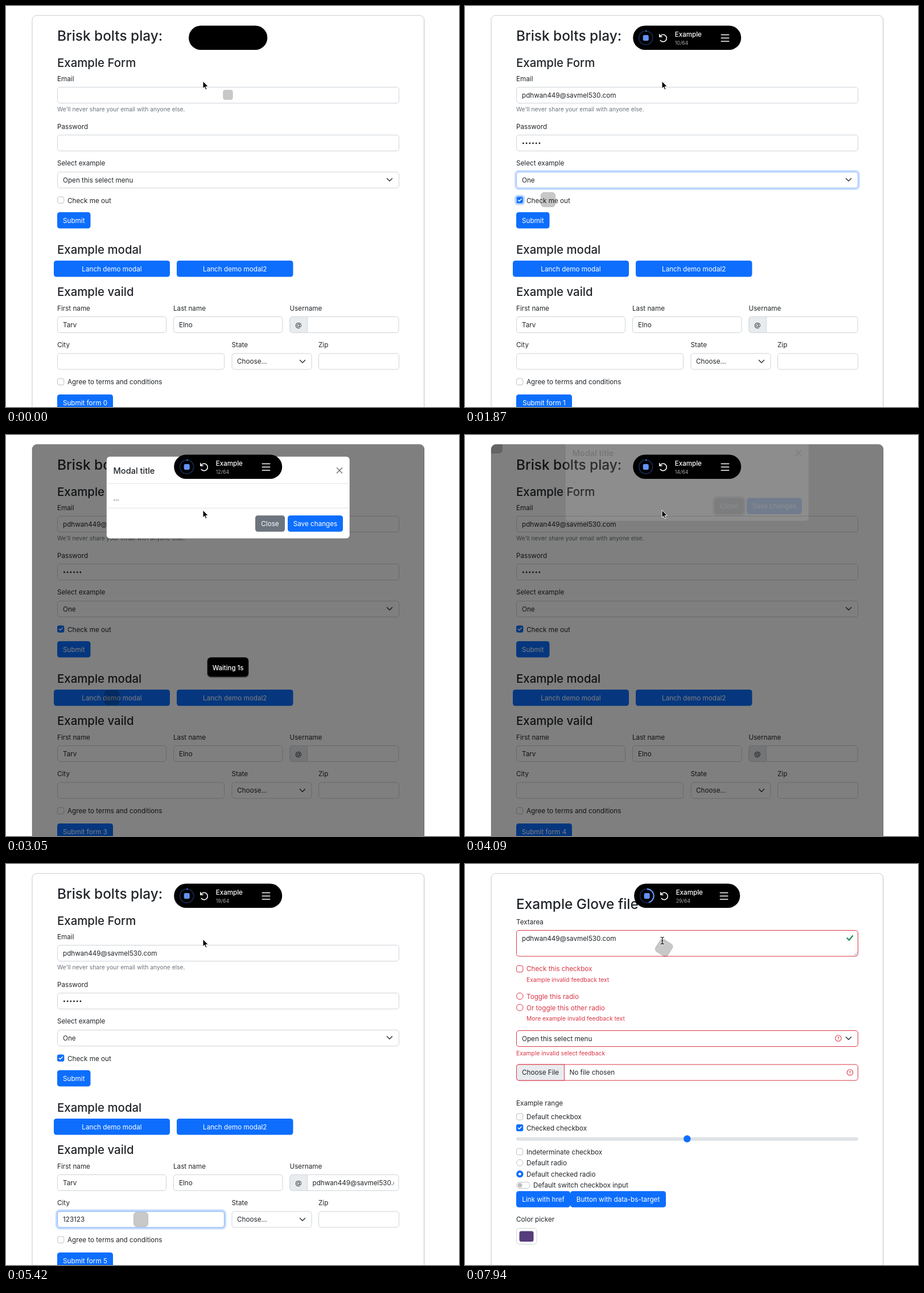
An HTML page for the animation above (8 s loop, 796 by 704 pixels).

```html
<!DOCTYPE html>
<html lang="en">
<head>
<meta charset="utf-8">
<title>Form autoplay</title>
<style>
  html, body { margin: 0; width: 100%; height: 100%; overflow: hidden; background: #fff; }
  svg { display: block; width: 796px; height: 704px; font-family: Inter, sans-serif; font-optical-sizing: none; }
</style>
</head>
<body>
<svg id="stage" viewBox="0 0 796 704"></svg>
<script>
const LOOP = 8000, SWITCH = 7370;
const INK = '#212529', BLUE = '#0d6efd', RED = '#dc3545', LINE = '#ced4da', MUTED = '#6c757d';
const EMAIL = 'pdhwan449@savmel530.com';
const BODY = 11.7, SMALL = 10.3, H3 = 20.4, H2 = 24.4;

// Markup helpers; text is placed by the middle of its capitals.
const text = (x, cy, s, { size = BODY, fill = INK, weight = 400, anchor = 'start', id = '' } = {}) =>
  `<text ${id && `id="${id}"`} x="${x}" y="${(cy + size * 0.362).toFixed(2)}" font-size="${size}" fill="${fill}" font-weight="${weight}" text-anchor="${anchor}">${s}</text>`;
const rect = (x, y, w, h, r, fill, stroke = 'none', extra = '') =>
  `<rect x="${x}" y="${y}" width="${w}" height="${h}" rx="${r}" fill="${fill}" stroke="${stroke}" ${extra}/>`;
const path = (d, stroke, width = 1.6, extra = '') =>
  `<path d="${d}" fill="none" stroke="${stroke}" stroke-width="${width}" stroke-linecap="round" stroke-linejoin="round" ${extra}/>`;
const circle = (x, y, r, fill, stroke = 'none', width = 1) =>
  `<circle cx="${x}" cy="${y}" r="${r}" fill="${fill}" stroke="${stroke}" stroke-width="${width}"/>`;
const heading = (cy, s, size = H3) => text(90, cy, s, { size, weight: 500 });
const field = (x, y, w, h = 28, stroke = LINE) => rect(x + .5, y + .5, w - 1, h, 4.5, '#fff', stroke);
const button = (x, y, w, s, fill = BLUE) =>
  rect(x, y, w, 28.5, 4.5, fill) + text(x + w / 2, y + 14.4, s, { fill: '#fff', anchor: 'middle' });
const chevron = (x, y) => path(`M${x - 4.5} ${y - 2.2}l4.5 4.5 4.5-4.5`, '#343a40');
const box = (y, stroke = '#bfbfbf') => rect(90.5, y + .5, 11.3, 11.3, 3, '#fff', stroke);
const tick = y => rect(90, y, 12.3, 12.3, 3, BLUE) + path(`M93.3 ${y + 6.3}l2 2 4-4.2`, '#fff', 1.5);
const radio = (y, stroke = '#bfbfbf') => circle(96.3, y, 5.7, '#fff', stroke);
const alert = (x, y) => circle(x, y, 5.2, 'none', RED, 1.1) + path(`M${x} ${y - 2.5}v2.6M${x} ${y + 2.4}v.1`, RED, 1.3);
const timed = (from, to, markup, fade = 0) =>
  `<g class="timed" data-from="${from}" data-to="${to}" data-fade="${fade}">${markup}</g>`;
const halo = (x, y, w, h, r = 6) =>
  rect(x - 1.5, y - 1.5, w + 3, h + 3, r, 'none', BLUE, 'stroke-width="3" stroke-opacity=".25"');
const focus = (from, to, x, y, w, h = 29, r = 6) =>
  timed(from, to, halo(x, y, w, h, r) + rect(x + .5, y + .5, w - 1, h - 1, r - 1.5, 'none', '#86b7fe'), 120);
const pressed = (from, to) => timed(from, to,
  halo(84, 447, 204, 28.5) + button(84, 447, 204, 'Lanch demo modal', '#0b5ed7'), 80);

const formPage = () => [
  heading(52, 'Brisk bolts play:', H2),
  heading(100, 'Example Form'),
  text(90, 127.5, 'Email'), field(90, 142, 601),
  text(90, 181.5, "We'll never share your email with anyone else.", { size: SMALL, fill: MUTED }),
  text(90, 211.5, 'Password'), field(90, 226, 601),
  text(90, 276, 'Select example'), field(90, 291, 601), chevron(674, 305),
  box(334.5), text(108, 341.5, 'Check me out'),
  button(90, 362, 58.5, 'Submit'),
  heading(428, 'Example modal'),
  button(84, 447, 204, 'Lanch demo modal'), button(300, 447, 204.5, 'Lanch demo modal2'),
  heading(502, 'Example vaild'),
  text(90, 531, 'First name'), field(90, 545, 192), text(100, 559.5, 'Tarv'),
  text(294, 531, 'Last name'), field(294, 545, 192.5), text(304, 559.5, 'Elno'),
  text(498.5, 531, 'Username'), field(498.5, 545, 192),
  path('M529 545.5H503.500a4.500 4.500 0 0 0-4.500 4.500v19a4.500 4.500 0 0 0 4.500 4.500H529z', LINE, 1, 'style="fill:#e9ecef"'),
  text(513.8, 559.5, '@', { anchor: 'middle' }),
  text(90, 595, 'City'), field(90, 609.5, 294),
  text(396.5, 595, 'State'), field(396.5, 609.5, 141), chevron(521, 624),
  text(549, 595, 'Zip'), field(549, 609.5, 142),
  box(653.5), text(108, 660, 'Agree to terms and conditions'),
  rect(90, 682, 98, 28.5, 4.5, BLUE), text(139, 697, '', { fill: '#fff', anchor: 'middle', id: 'seconds' }),

  timed(300, LOOP, text(100, 157, EMAIL)),
  timed(800, LOOP, [0, 1, 2, 3, 4, 5].map(i => circle(102.4 + i * 5.7, 241, 1.45, INK)).join('')),
  timed(0, 1400, text(100, 306, 'Open this select menu')),
  timed(1400, LOOP, text(100, 306, 'One')),
  timed(1780, LOOP, tick(334.5)),
  timed(4600, LOOP, `<g clip-path="url(#userClip)">${text(538.5, 559.5, EMAIL)}</g>`),
  timed(5300, LOOP, text(100, 624, '123123')),
  timed(5920, LOOP, tick(653.5)),
  timed(0, 6720, text(406, 624, 'Choose...')),
  timed(6720, LOOP, text(406, 624, '...')),
  timed(7040, LOOP, text(559, 624, '123123')),

  focus(150, 620, 90, 142, 601), focus(740, 1120, 90, 226, 601), focus(1190, 1855, 90, 291, 601),
  focus(1740, 2290, 90, 334.5, 12.3, 12.3, 4), pressed(2290, 2830), pressed(4240, 4640),
  focus(4420, 5080, 498.5, 545, 192), focus(5080, 5850, 90, 609.5, 294),
  focus(5870, 6350, 90, 653.5, 12.3, 12.3, 4), focus(6430, 6960, 396.5, 609.5, 141),
  focus(6980, 7250, 549, 609.5, 142)
].join('');

const red = { fill: RED }, smallRed = { fill: RED, size: SMALL };
const filePage = () => [
  heading(70, 'Example Glove file', H2),
  text(90, 101.5, 'Textarea'), field(90, 116, 601, 45.500, RED),
  path('M684 160.500l5-5M687 160.500l2-2', '#777', .8),
  timed(0, 7800, alert(676.5, 130)),
  timed(7800, LOOP, text(100, 131, EMAIL) + path('M671.500 130.200l3.300 3.400 6.200-7.400', '#198754', 2.2)),
  box(178, RED), text(108, 184, 'Check this checkbox', red),
  text(108, 203.500, 'Example invalid feedback text', smallRed),
  radio(232, RED), text(108, 233, 'Toggle this radio', red),
  radio(252, RED), text(108, 253, 'Or toggle this other radio', red),
  text(108, 271.500, 'More example invalid feedback text', smallRed),
  field(90, 292, 601, 28, RED), text(100, 307, 'Open this select menu'), alert(656, 306), chevron(674, 306),
  text(90, 332, 'Example invalid select feedback', smallRed),
  field(90, 351.500, 601, 28, RED),
  path('M174 352H95a4.500 4.500 0 0 0-4.500 4.500v19a4.500 4.500 0 0 0 4.500 4.500H174z', RED, 1, 'style="fill:#e9ecef"'),
  text(100, 366, 'Choose File'), text(183.500, 366, 'No file chosen'), alert(676.500, 366),
  text(90, 420, 'Example range'),
  box(437.500), text(108, 443.500, 'Default checkbox'),
  tick(457), text(108, 463.500, 'Checked checkbox'),
  rect(90, 479.700, 601, 6, 3, '#dee2e6'), circle(390.300, 482.500, 6.200, BLUE),
  box(499), text(108, 505.500, 'Indeterminate checkbox'),
  radio(524.500), text(108, 525, 'Default radio'),
  circle(96.300, 544.300, 6.200, BLUE), circle(96.300, 544.300, 2.400, '#fff'), text(108, 544.500, 'Default checked radio'),
  rect(90.500, 558.500, 23.500, 11, 5.500, '#fff', '#bfbfbf'), circle(96.500, 564, 4, '#bfbfbf'),
  text(120, 564, 'Default switch checkbox input'),
  button(90, 574.200, 95, 'Link with href'), button(185, 574.200, 168, 'Button with data-bs-target'),
  text(90, 624, 'Color picker'),
  rect(90.500, 639.500, 35.500, 28, 4.500, '#fff', LINE), rect(95.500, 644.500, 25, 18.500, 3.500, '#563d7c')
].join('');

const modal = () => [
  rect(176.500, 38.500, 427.500, 144, 6, '#fff', 'rgba(0,0,0,.2)'),
  text(188.500, 63, 'Modal title', { size: 14.600, weight: 500 }),
  path('M581.500 58.500l9 9m0-9l-9 9', '#777', 1.6),
  path('M177 86H603.500M177 129H603.500', '#dee2e6', 1),
  text(188.500, 111, '...'),
  button(438, 142, 52, 'Close', MUTED), button(495, 142, 97, 'Save changes'),
  timed(3780, 4300, rect(436.500, 140.500, 55, 31.500, 6, 'none', MUTED, 'stroke-width="3" stroke-opacity=".5"'))
].join('');

const pill = () => [
  `<g id="pillLeft">`,
  circle(22.500, 56, 12, 'none', '#152448', 2),
  `<circle id="arc" cx="22.500" cy="56" r="12" fill="none" stroke="#6592f0" stroke-width="2.300" pathLength="64" transform="rotate(-90 22.500 56)"/>`,
  rect(17.500, 51, 10, 10, 2.500, '#6592f5'),
  path('M47.300 53.700A6.200 6.200 0 1 1 48 60.300M46.600 49.800v4.200h4.200', '#fff', 1.6),
  text(73.500, 50, 'Example', { fill: '#fff', weight: 500, size: 11.600 }),
  text(73.500, 64.800, '', { fill: '#a8a8a8', size: 8.900, id: 'steps' }),
  `</g><g id="pillRight">${path('M-35 50.500h13.500M-35 56.200h13.500M-35 62h13.500', '#fff', 1.5)}</g>`
].join('');

document.getElementById('stage').innerHTML = `
  <defs>
    <clipPath id="cardClip">${rect(46, 16.500, 689, 720, 8.500, '#000')}</clipPath>
    <clipPath id="userClip">${rect(538, 546, 143.500, 27, 0, '#000')}</clipPath>
  </defs>
  ${rect(46.500, 17.500, 688.500, 720, 8, 'none', '#000', 'stroke-opacity=".06" stroke-width="3"')}
  ${rect(46, 16.500, 688.500, 720, 8, '#fff', '#cfcfd2')}
  ${timed(0, SWITCH, formPage())}
  ${timed(SWITCH, LOOP, filePage())}
  <g clip-path="url(#cardClip)">
    <rect id="dim" x="46" y="16" width="690" height="690"/>
    <g id="modal">${modal()}</g>
  </g>
  ${timed(2600, 3600, rect(353, 390, 74, 36.500, 7, 'rgba(0,0,0,.25)')
    + rect(354, 390.500, 72, 34, 6, '#000')
    + text(390, 408.500, 'Waiting 1s', { fill: '#fff', weight: 500, size: 11.400, anchor: 'middle' }))}
  <rect id="pill" y="34.500" height="42.500" rx="21.250"/>
  <g id="pillContent">${pill()}</g>
  <g clip-path="url(#cardClip)">
    <g id="pointer">${rect(-12.700, -12.700, 25.400, 25.400, 5.500, 'rgba(0,0,0,.215)', 'rgba(0,0,0,.14)')}</g>
  </g>
  ${timed(0, SWITCH, path('M346 132.200v12.800l2.900-2.700 2 4.700 2.100-.9-2-4.600h4z', '#fff', 1, 'style="fill:#000"'))}
  ${timed(SWITCH, LOOP, path('M344 128.500q2.700 0 2.700 2v8q0 2 -2.700 2M349.400 128.500q-2.700 0-2.700 2v8q0 2 2.700 2M345.300 134.800h2.800', '#fff', 2.4)
    + path('M344 128.500q2.700 0 2.700 2v8q0 2 -2.700 2M349.400 128.500q-2.700 0-2.700 2v8q0 2 2.700 2M345.300 134.800h2.800', '#000', 1.1))}`;

const el = Object.fromEntries([...document.querySelectorAll('[id]')].map(n => [n.id, n]));
const timedParts = [...document.querySelectorAll('.timed')].map(node => ({
  node, from: +node.dataset.from, to: +node.dataset.to, fade: +node.dataset.fade
}));
const ramp = (t, a, b) => Math.min(1, Math.max(0, (t - a) / (b - a)));
const smooth = u => u * u * (3 - 2 * u);
const easeOut = u => 1 - (1 - u) ** 3;

// Pointer stops: start of move, arrival, x, y
const stops = [
  [-300, -55, 390, 156], [500, 750, 390, 240], [950, 1200, 390, 305], [1480, 1750, 146, 340],
  [2000, 2290, 186, 461], [3500, 3750, 464, 157], [3815, 4113, 46, 17], [4113, 4400, 609.5, 559],
  [4850, 5080, 237, 624], [5600, 5870, 96, 660], [6150, 6430, 466.5, 624], [6780, 6980, 620, 624],
  [7080, 7300, 139, 697], [7420, 7690, 390, 139], [7860, 8160, 165, 184]
];
// Step counter: time, value
const progress = [[0, 1], [1800, 10], [2300, 12], [3500, 13], [3850, 14], [4250, 15], [6500, 23], [7850, 29]];

function stepAt(t) {
  const i = progress.findLastIndex(p => p[0] <= t);
  const [t0, v0] = progress[i], [t1, v1] = progress[i + 1] || [LOOP, v0];
  return Math.floor(v0 + (v1 - v0) * ramp(t, t0, t1));
}

function movePointer(t) {
  const i = stops.findLastIndex(s => s[0] <= t);
  const [start, end, x, y] = stops[i], [, , px, py] = stops[i - 1] || stops[i];
  const p = smooth(ramp(t, start, end));
  const scale = 1 - 0.34 * Math.sin(Math.PI * ramp(t, end, end + 110));
  el.pointer.setAttribute('transform',
    `translate(${px + (x - px) * p} ${py + (y - py) * p}) rotate(${180 * p}) scale(${scale})`);
}

function drawPill(t) {
  const late = t >= SWITCH;
  const u = ramp(t, late ? 7400 : -225, late ? 8170 : 545);
  const w = 43 + 147 * easeOut(u), left = 390.2 - w / 2;
  el.pill.setAttribute('x', left);
  el.pill.setAttribute('width', w);
  el.pillContent.setAttribute('opacity', ramp(u, 0.35, 0.65));
  el.pillLeft.setAttribute('transform', `translate(${left})`);
  el.pillRight.setAttribute('transform', `translate(${left + w})`);
  el.arc.setAttribute('stroke-dasharray', `${late ? 29 : 1.4} 64`);
  el.steps.textContent = stepAt(t) + '/64';
}

function draw(t) {
  for (const { node, from, to, fade } of timedParts) {
    const live = t >= from && t < to + fade;
    node.style.display = live ? '' : 'none';
    if (live && fade) node.setAttribute('opacity', ramp(t, from, from + fade) * (1 - ramp(t, to, to + fade)));
  }
  el.dim.setAttribute('opacity', 0.5 * (ramp(t, 2670, 2820) - ramp(t, 4225, 4365)));
  const slide = easeOut(ramp(t, 2830, 3130)) - easeOut(ramp(t, 3958, 4258));
  el.modal.setAttribute('opacity', ramp(t, 2830, 2980) - ramp(t, 3958, 4108));
  el.modal.setAttribute('transform', `translate(0 ${-38 * (1 - slide)})`);
  el.seconds.textContent = 'Submit form ' + Math.floor(t / 1000);
  drawPill(t);
  movePointer(t);
}

const begin = performance.now();
function frame(now) {
  draw(Math.max(0, now - begin) % LOOP);
  requestAnimationFrame(frame);
}
draw(0);
requestAnimationFrame(frame);
</script>
</body>
</html>
```
